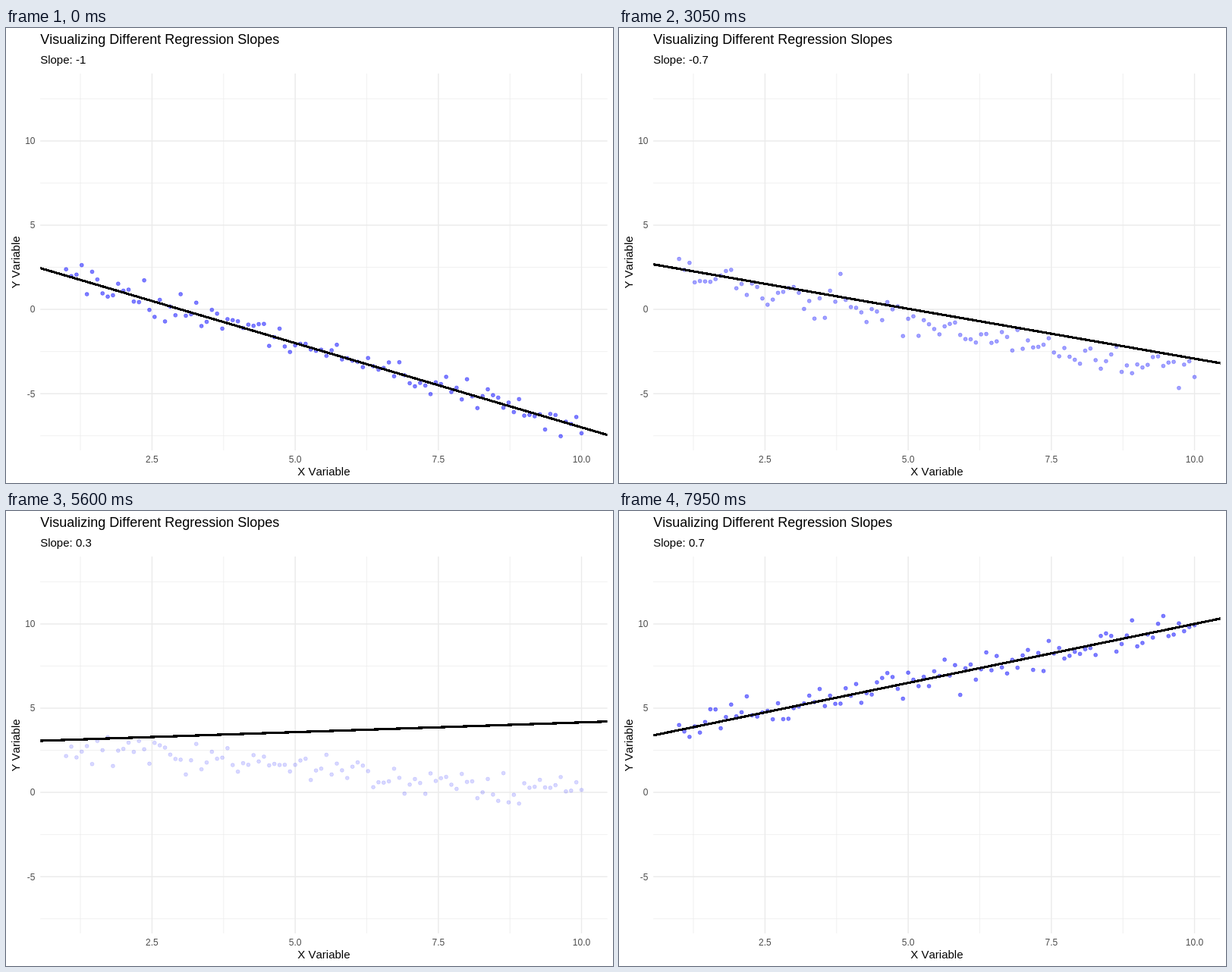
An HTML page for the animation above (8 s loop, 800 px wide and 600 px high).

```html
<!DOCTYPE html>
<html lang="en">
<head>
<meta charset="utf-8">
<title>Visualizing Different Regression Slopes</title>
<style>
html, body { margin: 0; width: 100%; height: 100%; overflow: hidden; background: #fff; }
svg { display: block; width: 800px; height: 600px; font: 15px "Liberation Sans", Arial, sans-serif; font-kerning: none; }
.tick { font-size: 12px; fill: #4d4d4d; }
.grid { stroke: #ebebeb; stroke-width: 1.46; }
.minor { stroke-width: .73; }
#dots { fill: #00f; stroke: #00f; stroke-width: .7; }
#fit { stroke: #000; stroke-width: 3.2; shape-rendering: crispEdges; }
</style>
</head>
<body>
<svg viewBox="0 0 800 600">
  <clipPath id="panel"><rect x="45.2" y="60" width="747.4" height="497"/></clipPath>
  <g id="grid"></g>
  <g clip-path="url(#panel)">
    <g id="dots"></g>
    <line id="fit"/>
  </g>
  <text x="45.2" y="21" font-size="18">Visualizing Different Regression Slopes</text>
  <text id="sub" x="45.2" y="47"></text>
  <text x="418.9" y="590" text-anchor="middle">X Variable</text>
  <text transform="translate(18 309) rotate(-90)" text-anchor="middle">Y Variable</text>
</svg>
<script>
const LOOP = 8000, STEP = 50, ALPHA = 0.5;
const INTERCEPT = 3, POINTS = 100, SPREAD = 0.5;
const SLOPES = [-1, -0.7, -0.3, 0.3, 0.7];
// Start time and number of steps of each change of slope
const MOVES = [[700, 27], [2750, 26], [4750, 26], [6700, 26]];

const $ = id => document.getElementById(id);
const px = x => 45.25 + (x - 0.55) * 75.48;
const py = y => 371.1 - y * 22.22;
const fitY = (slope, x) => INTERCEPT + slope * x;

function set(el, attrs) {
  for (const k in attrs) el.setAttribute(k, attrs[k]);
  return el;
}

function add(parent, tag, attrs, text = "") {
  const el = set(document.createElementNS("http://www.w3.org/2000/svg", tag), attrs);
  el.textContent = text;
  return parent.appendChild(el);
}

// Seeded uniform numbers, turned into normal ones
let seed = 123;
function random() {
  seed = (seed + 0x6d2b79f5) | 0;
  let r = Math.imul(seed ^ (seed >>> 15), seed | 1);
  r ^= r + Math.imul(r ^ (r >>> 7), r | 61);
  return ((r ^ (r >>> 14)) >>> 0) / 2 ** 32;
}
const normal = () => Math.sqrt(-2 * Math.log(1 - random())) * Math.cos(2 * Math.PI * random());

// One noisy sample per slope, x evenly spaced from 1 to 10
const samples = SLOPES.map(slope => {
  const g = add($("dots"), "g", {});
  for (let i = 0; i < POINTS; i++) {
    const x = 1 + 9 * i / (POINTS - 1);
    add(g, "circle", { cx: px(x), cy: py(fitY(slope, x) + SPREAD * normal()), r: 2.49 });
  }
  return g;
});

// Grid and tick labels
const grid = $("grid");
const hLine = (y, cls) => add(grid, "line", { x1: 45.2, x2: 792.6, y1: py(y), y2: py(y), class: cls });
const vLine = (x, cls) => add(grid, "line", { x1: px(x), x2: px(x), y1: 60, y2: 557, class: cls });
for (let y = -7.5; y <= 12.5; y += 5) hLine(y, "grid minor");
for (let x = 1.25; x < 10; x += 2.5) vLine(x, "grid minor");
for (let y = -5; y <= 10; y += 5) {
  hLine(y, "grid");
  add(grid, "text", { x: 38.5, y: py(y) + 4.3, "text-anchor": "end", class: "tick" }, String(y));
}
for (let x = 2.5; x <= 10; x += 2.5) {
  vLine(x, "grid");
  add(grid, "text", { x: px(x), y: 573.2, "text-anchor": "middle", class: "tick" }, x.toFixed(1));
}

function draw(t) {
  let from = 0, p = 0;
  MOVES.forEach(([start, steps], i) => {
    if (t < start) return;
    from = i;
    p = Math.min(1, (Math.floor((t - start) / STEP) + 1) / steps);
  });
  if (p === 1) { from++; p = 0; }

  const a = SLOPES[from];
  const b = p ? SLOPES[from + 1] : a;
  const slope = a + (b - a) * p;
  const x1 = 0.4, x2 = 10.6;
  set($("fit"), { x1: px(x1), y1: py(fitY(slope, x1)), x2: px(x2), y2: py(fitY(slope, x2)) });

  // The old sample fades away; the next one appears at once when the line arrives
  samples.forEach((g, i) => { g.style.display = i === from ? "" : "none"; });
  const alpha = ALPHA * (1 - p);
  set($("dots"), { "fill-opacity": alpha, "stroke-opacity": alpha });
  $("sub").textContent = "Slope: " + (p > 0.5 ? b : a);
}

const t0 = performance.now();
function tick() {
  draw((performance.now() - t0) % LOOP);
  requestAnimationFrame(tick);
}
tick();
</script>
</body>
</html>
```
